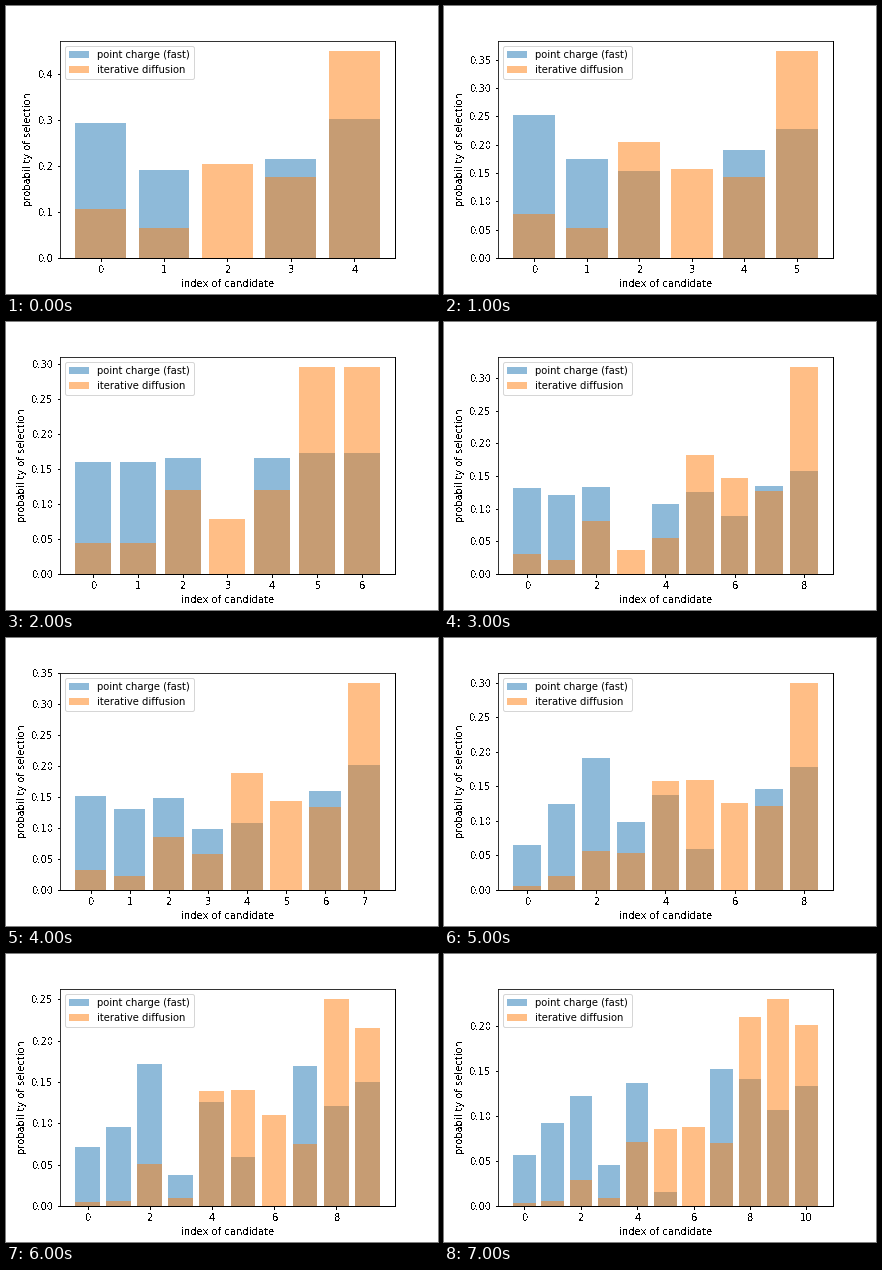
A matplotlib script for the animation above (8 s loop, 432 by 288 pixels).

```python
import matplotlib.pyplot as plt
import numpy as np
from matplotlib.animation import FuncAnimation

STEP_MS = 1000

# Laplacian growth on a square grid, cells as (row, column)
SIZE = 11
GOAL = (SIZE - 1, SIZE // 2)
SEED = [(0, 5), (0, 6), (1, 6)]
GROWTH = [(0, 4), (1, 4), (2, 6), (1, 5), (1, 3), (2, 7), (2, 3)]
RELAXATIONS = 600


def find_candidates(cluster):
    """Free cells that share a side with the cluster, in reading order."""
    near = {(r + dr, c + dc) for r, c in cluster
            for dr, dc in ((-1, 0), (1, 0), (0, -1), (0, 1))}
    return sorted(cell for cell in near - set(cluster)
                  if 0 <= min(cell) and max(cell) < SIZE)


def point_charge(cluster, candidates):
    """Sum 1/r terms: the cluster repels, the goal attracts."""
    def pull(cell, charge):
        return 1 / np.hypot(cell[0] - charge[0], cell[1] - charge[1])

    phi = np.array([pull(cell, GOAL) - sum(pull(cell, q) for q in cluster)
                    for cell in candidates])
    phi -= phi.min()
    return phi / phi.sum()


def iterative_diffusion(cluster, candidates):
    """Relax the Laplace equation with grounded walls and cluster."""
    rows, cols = np.transpose(cluster)
    phi = np.zeros((SIZE + 2, SIZE + 2))
    inner = phi[1:-1, 1:-1]
    inner[GOAL] = 1
    for _ in range(RELAXATIONS):
        inner[:] = (phi[:-2, 1:-1] + phi[2:, 1:-1]
                    + phi[1:-1, :-2] + phi[1:-1, 2:]) / 4
        inner[rows, cols] = 0
        inner[GOAL] = 1
    picked = np.array([inner[cell] for cell in candidates])
    return picked / picked.sum()


def hard_edges(img, dpi):
    """Make every pixel either fully opaque or fully transparent."""
    out = img.copy()
    out[..., 3] = img[..., 3] >= 0.5
    return out, 0, 0


plt.rcParams.update({"font.family": "DejaVu Sans", "font.size": 10})
fig = plt.figure(figsize=(6, 4), dpi=72, facecolor="white")
ax = fig.add_axes([0.125, 0.125, 0.775, 0.755])


def draw(step):
    cluster = SEED + GROWTH[:step]
    candidates = find_candidates(cluster)
    index = range(len(candidates))

    ax.clear()
    ax.bar(index, point_charge(cluster, candidates),
           alpha=0.5, color="C0", label="point charge (fast)")
    ax.bar(index, iterative_diffusion(cluster, candidates),
           alpha=0.5, color="C1", label="iterative diffusion")
    ax.set_xlabel("index of candidate")
    ax.set_ylabel("probability of selection")
    ax.legend(loc="best")
    for part in (ax.xaxis, ax.yaxis, ax.spines["bottom"], ax.spines["right"]):
        part.set_agg_filter(hard_edges)
    return []


anim = FuncAnimation(fig, draw, frames=len(GROWTH) + 1,
                     init_func=lambda: draw(0), interval=STEP_MS,
                     repeat=True, repeat_delay=0, blit=False)
plt.show()
```
